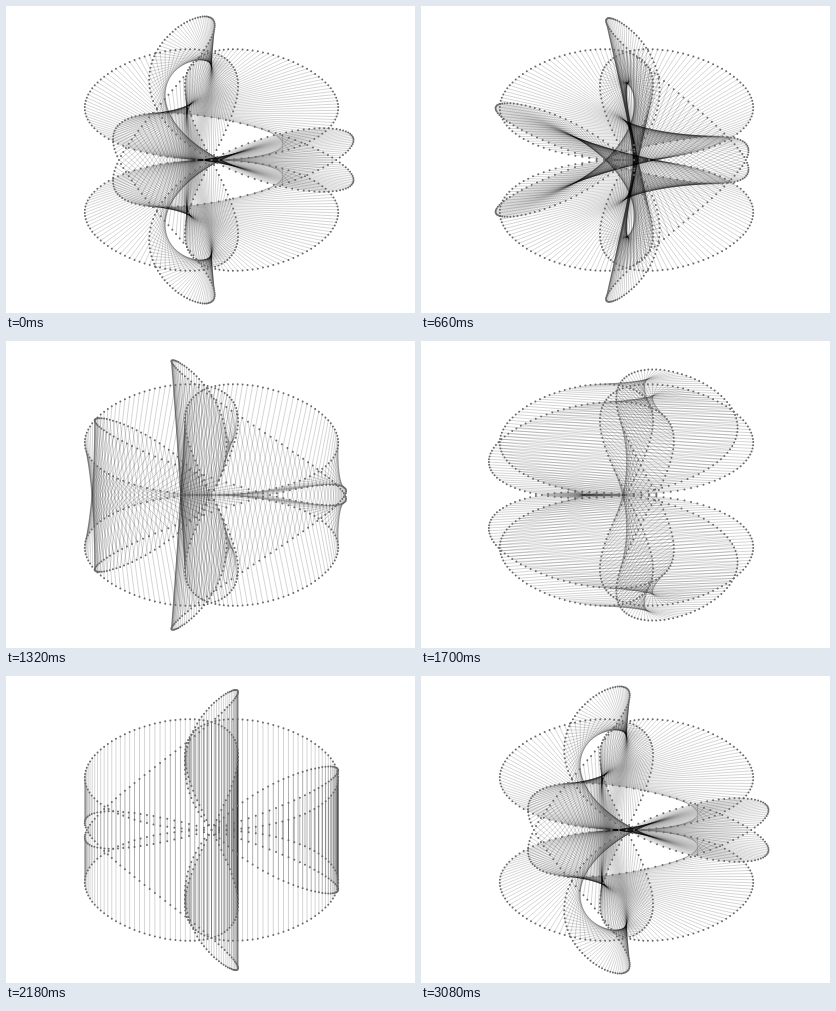
Write an HTML page that moves like this. It is 409 px wide and 307 px high and loops after 3.12 s.

```html
<!DOCTYPE html>
<html lang="en">
<head>
<meta charset="utf-8">
<title>Linked harmonic curves</title>
<style>
  html, body { margin: 0; width: 100%; height: 100%; overflow: hidden; background: #fff; }
  svg { display: block; width: 100vw; height: 100vh; }
  line { stroke: #000; stroke-opacity: .28; stroke-width: .6; }
  .dots { fill: none; stroke: #6a6a6a; stroke-width: 2; stroke-linecap: round; }
</style>
</head>
<body>
<svg viewBox="0 0 409 307">
  <g id="links"></g>
  <path id="fixed" class="dots"/>
  <path id="moving" class="dots"/>
</svg>
<script>
const COUNT = 360;
const CENTER = { x: 205.5, y: 154 };
const RADIUS = 72;
const STEP = 8;           // degrees per pose
const START = -40;        // the two curves coincide at 0 degrees
const slow = Array(6).fill(100);
const delays = [
  60, 60, 40, 40, 20, 20, 40, 40, 60, 80, 100, ...slow,
  80, 80, 80, 60, 60, 60, 40, 40, 40, 40, 40,
  40, 60, 60, 60, 60, 60, 60, 60, 80, ...slow, 80, 80, 40
];
const LOOP = delays.reduce((sum, d) => sum + d, 0);

const sin = degrees => Math.sin(degrees * Math.PI / 180);

function curve(xPhase, yPhase) {
  return Array.from({ length: COUNT }, (_, i) => {
    const u = i * 360 / COUNT;
    return {
      x: CENTER.x + RADIUS * (sin(4 * u + xPhase) - sin(2 * u + xPhase)),
      y: CENTER.y - RADIUS * (sin(u + yPhase) + sin(3 * u + yPhase))
    };
  });
}

const dotPath = points =>
  points.map(p => `M${p.x.toFixed(2)} ${p.y.toFixed(2)}h.01`).join('');

const fixed = curve(0, 0);
const movingDots = document.getElementById('moving');
const linkGroup = document.getElementById('links');
document.getElementById('fixed').setAttribute('d', dotPath(fixed));

const links = fixed.map(p => {
  const line = document.createElementNS('http://www.w3.org/2000/svg', 'line');
  line.setAttribute('x1', p.x);
  line.setAttribute('y1', p.y);
  return linkGroup.appendChild(line);
});

function poseAt(ms) {
  let left = ms % LOOP;
  let pose = 0;
  while (left >= delays[pose]) left -= delays[pose++];
  return pose;
}

let shown = -1;
function render(ms) {
  const pose = poseAt(ms);
  if (pose === shown) return;
  shown = pose;
  const turn = START + STEP * pose;
  const points = curve(-3 * turn, -2 * turn);
  movingDots.setAttribute('d', dotPath(points));
  points.forEach((p, i) => {
    links[i].setAttribute('x2', p.x);
    links[i].setAttribute('y2', p.y);
  });
}

const begin = performance.now();
function tick() {
  render(performance.now() - begin);
  requestAnimationFrame(tick);
}
tick();
</script>
</body>
</html>
```
